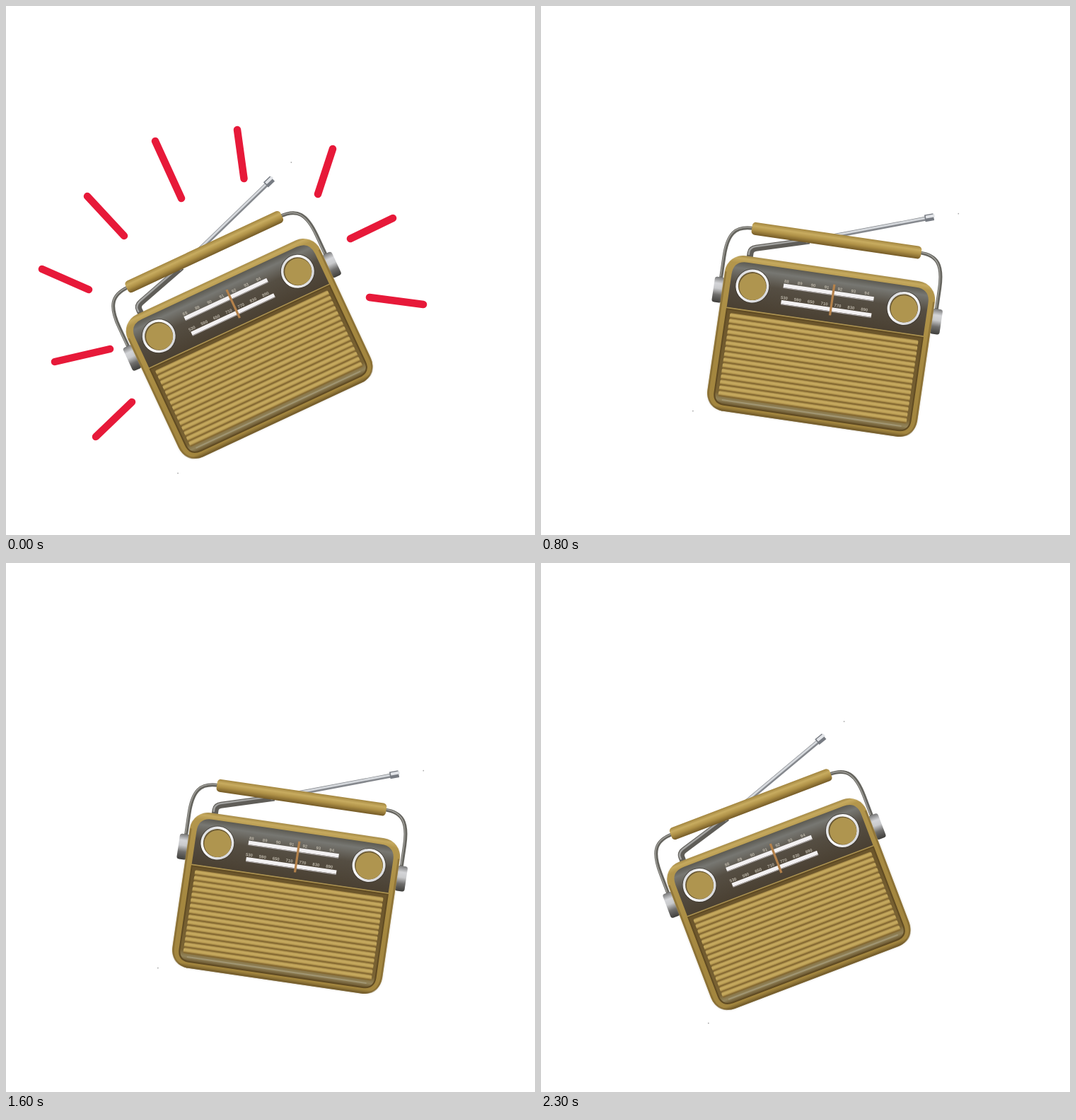
Recreate the animation shown at these times as an HTML page. Size 748 by 748 pixels, loop 2.4 s.

```html
<!DOCTYPE html>
<html lang="en">
<head>
<meta charset="utf-8">
<title>Rocking radio</title>
<style>
  html, body { margin: 0; width: 100%; height: 100%; overflow: hidden; background: #fff; }
  svg { display: block; width: 100vw; height: 100vh; }
  text { font: bold 6px "Liberation Sans", Arial, sans-serif; fill: #b9b3a6; text-anchor: middle; }
</style>
</head>
<body>
<svg viewBox="0 0 748 748">
  <defs>
    <linearGradient id="body" x2="0" y2="1">
      <stop offset="0" stop-color="#a58a46"/><stop offset=".02" stop-color="#c6aa5f"/>
      <stop offset=".05" stop-color="#b3964c"/><stop offset=".6" stop-color="#a4873f"/>
      <stop offset=".97" stop-color="#a3863f"/><stop offset="1" stop-color="#715a29"/>
    </linearGradient>
    <linearGradient id="panel" x2="0" y2="1">
      <stop offset="0" stop-color="#5c5a52"/><stop offset=".14" stop-color="#777772"/>
      <stop offset=".45" stop-color="#554e43"/><stop offset="1" stop-color="#4a4032"/>
    </linearGradient>
    <linearGradient id="tray" x2="0" y2="1">
      <stop offset="0" stop-color="#6b552b"/><stop offset=".88" stop-color="#7a6333"/>
      <stop offset=".95" stop-color="#93845a"/><stop offset="1" stop-color="#66512a"/>
    </linearGradient>
    <linearGradient id="grip" x2="0" y2="1">
      <stop offset="0" stop-color="#a2853f"/><stop offset=".3" stop-color="#c8ac60"/>
      <stop offset=".6" stop-color="#af9147"/><stop offset="1" stop-color="#745a26"/>
    </linearGradient>
    <linearGradient id="steel" x2="0" y2="1">
      <stop offset="0" stop-color="#777"/><stop offset=".25" stop-color="#d4d5d8"/>
      <stop offset=".45" stop-color="#c9cacc"/><stop offset=".7" stop-color="#6f6e6c"/>
      <stop offset="1" stop-color="#3f3e3b"/>
    </linearGradient>
    <linearGradient id="ring" x2="1" y2="1">
      <stop offset="0" stop-color="#c5c7cb"/><stop offset=".4" stop-color="#fff"/>
      <stop offset="1" stop-color="#c9cacd"/>
    </linearGradient>
    <linearGradient id="slat" x2="0" y2="1">
      <stop offset="0" stop-color="#a78a48"/><stop offset=".3" stop-color="#c8ac61"/>
      <stop offset=".6" stop-color="#bb9e54"/><stop offset=".82" stop-color="#876b34"/>
      <stop offset="1" stop-color="#84682f"/>
    </linearGradient>
    <filter id="soft" x="-10%" y="-10%" width="120%" height="120%"><feGaussianBlur stdDeviation="1.5"/></filter>
  </defs>

  <g id="radio">
    <g fill="#aaa"><circle cx="548" cy="265.5" r=".9"/><circle cx="217" cy="596" r=".9"/></g>

    <g fill="none">
      <path d="M265 370V363Q265 357 272 355L345 334" stroke="#5f5d58" stroke-width="9"/>
      <path d="M263 366V361Q264 355.500 271 353L345 331.500" stroke="#a3a3a1" stroke-width="2.5"/>
      <path d="M340 335.500L505 278.500" stroke="#85888d" stroke-width="6"/>
      <path d="M340 334.500L505 277.500" stroke="#d5d8dc" stroke-width="2.8"/>
      <path d="M502 279L514 275" stroke="#777b82" stroke-width="10"/>
      <path d="M503 277L515 273" stroke="#e2e4e8" stroke-width="4"/>
      <path d="M264 328C238 328 229 341 229 374V406M502 328C528 328 537 341 537 374V406" stroke="#66655f" stroke-width="5"/>
      <path d="M262 327.300C237 328 228 341 228 374V402M504 327.300C527 328 536 341 536 374V402" stroke="#a5a49f" stroke-width="1.3"/>
    </g>
    <rect x="262" y="319" width="242" height="18" rx="5" fill="url(#grip)"/>

    <g fill="url(#steel)">
      <rect x="220.500" y="403" width="14" height="36" rx="3.500"/>
      <rect x="532" y="403" width="14" height="36" rx="3.500"/>
    </g>
    <rect x="233" y="369" width="300" height="221" rx="26" fill="#988e79" opacity=".4" filter="url(#soft)"/>
    <rect x="233" y="368" width="300" height="222" rx="26" fill="url(#body)"/>
    <path d="M234.500 394V562Q234.500 588.500 260 588.500H507Q531.500 588.500 531.500 562V394" fill="none" stroke="#755d2c" stroke-width="2.500" opacity=".5"/>

    <path d="M243 444V397Q243 377 263 377H504Q524 377 524 397V444Z" fill="url(#panel)"/>
    <path d="M243 444.500H524" stroke="#ac9352" stroke-width="2"/>
    <path d="M243.500 446H523.500V565Q523.500 581 507 581H260Q243.500 581 243.500 565Z" fill="url(#tray)" stroke="#604b23" stroke-width="2"/>
    <g id="slats"></g>
    <path d="M256 574.500H511" stroke="#a09572" stroke-width="2" stroke-linecap="round"/>

    <g id="dials"></g>
    <g fill="#f3f1f2">
      <rect x="318" y="399" width="129" height="5.500"/>
      <rect x="318" y="422.500" width="129" height="5.500"/>
    </g>
    <path d="M318 405H447M318 428.500H447" stroke="#aaa5a4" stroke-width="1.200"/>
    <g id="scale"></g>
    <path d="M389 390V434" stroke="#b5824b" stroke-width="3.200"/>
  </g>

  <path id="rays" fill="none" stroke="#e71939" stroke-width="10.500" stroke-linecap="round"
    d="M211 191L248 272M327 175L336.500 244M462 202L441 266M547 300L487 329M514 412L590 422
       M115 269L167 325M51 372L117 401M69 503L147 485M127 609L178 560"/>
</svg>
<script>
  const $ = id => document.getElementById(id);
  const repeat = (n, part) => Array.from({ length: n }, (_, i) => part(i)).join('');

  $('slats').innerHTML = repeat(15, i =>
    `<rect x="249" y="${451 + i * 7.93}" width="269" height="7.93" rx="2" fill="url(#slat)"/>`);

  $('dials').innerHTML = [274.5, 491].map(x => `
    <circle cx="${x}" cy="409" r="24.5" fill="#34302a" opacity=".6"/>
    <circle cx="${x}" cy="409" r="23.5" fill="url(#ring)"/>
    <circle cx="${x}" cy="409" r="20" fill="#6b5a35"/>
    <circle cx="${x + .6}" cy="409.8" r="19" fill="#af954f"/>`).join('');

  $('scale').innerHTML = repeat(7, i => {
    const x = 321.5 + i * 19.1;
    return `<text x="${x}" y="397.5">${88 + i}</text><text x="${x}" y="421">${530 + i * 60}</text>`;
  });

  const pivot = '375.7 569.5';
  const turn = (el, angle) => el.setAttribute('transform', `rotate(${angle} ${pivot})`);
  const start = performance.now();

  function draw() {
    const step = Math.floor((performance.now() - start) / 100) % 24;
    turn($('radio'), 25 - Math.abs(step - 12) * 25 / 6);
    // Rays flash only at the two ends of the swing.
    $('rays').style.display = step % 12 ? 'none' : '';
    turn($('rays'), step === 12 ? 47.3 : 0);
    requestAnimationFrame(draw);
  }
  draw();
</script>
</body>
</html>
```
